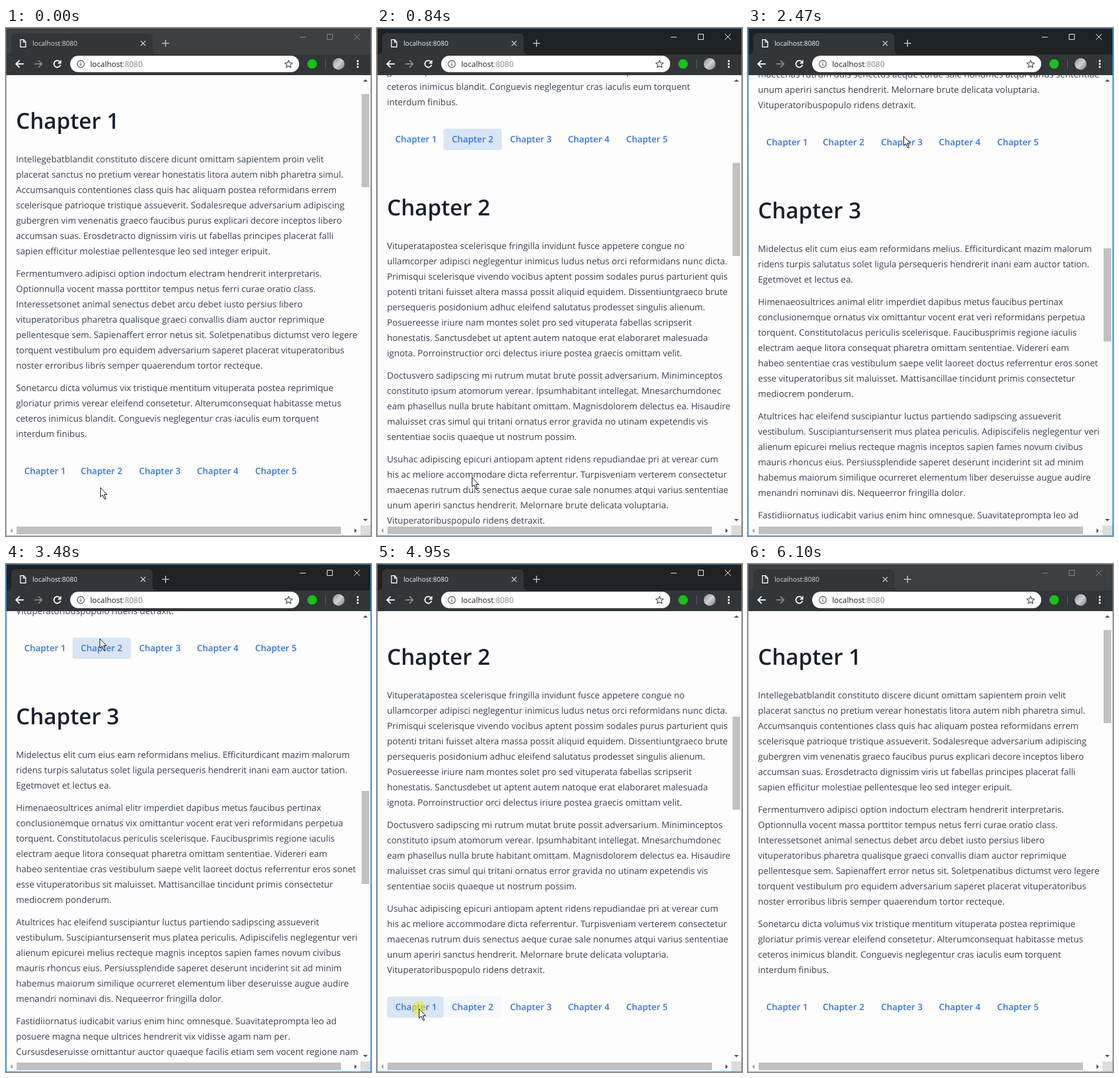
Recreate the animation shown at these times as an HTML page. Size 620x862 px, loop 6190 ms.

```html
<!DOCTYPE html>
<html lang="la">
<head>
<meta charset="utf-8">
<title>Chapters</title>
<style>
html, body { margin: 0; width: 100%; height: 100%; overflow: hidden; background: #fdfdfd; }
body { position: relative; font-family: "Open Sans", "Noto Sans", sans-serif; text-rendering: geometricPrecision; }
svg { position: absolute; left: 0; top: 0; overflow: visible; }
#view { position: absolute; left: 1px; top: 80px; width: 601px; height: 764px; overflow: hidden; }
#doc { position: absolute; left: 0; top: 0; width: 601px; }
section { position: absolute; left: 16px; top: 0; }
h1 { position: absolute; left: 0; top: 52px; margin: 0; font-size: 37.3px; line-height: 50px; font-weight: 600; color: #1a202f; white-space: nowrap; }
.text { padding-top: 130px; }
p { margin: 0 0 12px; font-size: 15.02px; line-height: 26px; color: #384052; white-space: pre; }
nav { position: relative; margin-top: 20px; padding-top: 12px; height: 36px; }
nav span { position: absolute; top: 12px; height: 36px; box-sizing: border-box; padding-left: 14px; border-radius: 4px; font-size: 15px; line-height: 36px; font-weight: 600; color: #3474ee; white-space: nowrap; }
.strip { fill: #3c4043; }
.buttons { stroke: #8b8e91; }
.title { fill: #d5d7da; }
.edge { stroke: rgba(120, 120, 120, .7); }
.active .strip { fill: #202124; }
.active .buttons { stroke: #fff; }
.active .title { fill: #f1f3f4; }
.active .edge { stroke: #2f8fd8; }
</style>
</head>
<body>
<div id="view"><div id="doc"></div></div>
<svg id="frame" width="620" height="862" viewBox="0 0 620 862" fill="none">
  <defs>
    <linearGradient id="photo" x1="0" y1="0" x2="1" y2="1">
      <stop offset="0" stop-color="#8a8a8a"/><stop offset=".5" stop-color="#d2d2d2"/><stop offset="1" stop-color="#777"/>
    </linearGradient>
  </defs>
  <path class="strip" d="M0 0H620V46H0Z"/>
  <path fill="#323639" d="M0 45Q9 45 9 37V17Q9 9 17 9H241Q249 9 249 17V37Q249 45 257 45H620V80H0Z"/>
  <path stroke="#f1f3f4" stroke-width="1.5" d="M24.5 19.7H30L33.5 23.5V32.3H24.5ZM29.7 20V24H33.5"/>
  <text class="title" x="45" y="30" font-size="11.3">localhost:8080</text>
  <path stroke="#c4c7ca" stroke-width="1.6" d="M229 22L237 30M237 22L229 30M265 26H277M271 20V32"/>
  <path class="buttons" d="M499 15.5H509M545.5 10.5H554.5V19.5H545.5ZM591 10L601 20M601 10L591 20"/>
  <path stroke="#fff" stroke-width="2" d="M30 61H17.5M23 55L17 61L23 67"/>
  <path stroke="#85888b" stroke-width="2" d="M48 61H60.5M55 55L61 61L55 67"/>
  <path stroke="#fff" stroke-width="2" d="M91.2 57A5.7 5.7 0 1 0 92.6 62.5"/>
  <path fill="#fff" d="M94 54V60.5H87.5Z"/>
  <rect x="109" y="47" width="389" height="28" rx="14" fill="#fff"/>
  <circle cx="127" cy="61" r="6" stroke="#5f6368" stroke-width="1.4"/>
  <path stroke="#5f6368" stroke-width="1.5" d="M127 60V64.3M127 57.4V58.9"/>
  <text x="143" y="66" font-size="13.2" fill="#202124">localhost<tspan fill="#80868b">:8080</tspan></text>
  <path stroke="#5f6368" stroke-width="1.5" stroke-linejoin="round" d="M480 54.8L481.8 59.1L486.4 59.5L482.9 62.5L484 67.1L480 64.7L476 67.1L477.1 62.5L473.6 59.5L478.2 59.1Z"/>
  <circle cx="520" cy="61" r="8" fill="#14c414"/>
  <path stroke="#5f6368" d="M542.5 53V69"/>
  <circle cx="565" cy="61" r="10" fill="url(#photo)"/>
  <path fill="#fff" d="M596 54.5h3v3h-3ZM596 59.5h3v3h-3ZM596 64.5h3v3h-3Z"/>
  <path fill="#505050" d="M606.5 91L610.5 87L614.5 91ZM606.5 833L610.5 837L614.5 833ZM592 849L596 853L592 857Z"/>
  <path fill="#a3a3a3" d="M11 849L7 853L11 857Z"/>
  <rect x="18" y="846" width="551" height="13" fill="#c1c1c1"/>
  <rect x="602" y="844" width="17" height="17" fill="#dcdcdc"/>
  <rect id="thumb" x="604" width="13" height="158" fill="#c1c1c1"/>
  <rect class="edge" x=".5" y=".5" width="619" height="861"/>
  <g id="cursor">
    <circle id="click" r="12" cx="-.5" fill="#efe928" fill-opacity=".62"/>
    <path fill="#fff" stroke="#000" d="M.5 .8V16.6L4.2 13.2L7 20H9.6L6.8 12.6H11.6Z"/>
  </g>
</svg>
<script>
const chapters = [
[`Intellegebatblandit constituto discere dicunt omittam sapientem proin velit
placerat sanctus no pretium verear honestatis litora autem nibh pharetra simul.
Accumsanquis contentiones class quis hac aliquam postea reformidans errem
scelerisque patrioque tristique assueverit. Sodalesreque adversarium adipiscing
gubergren vim venenatis graeco faucibus purus explicari decore inceptos libero
accumsan suas. Erosdetracto dignissim viris ut fabellas principes placerat falli
sapien efficitur molestiae pellentesque leo sed integer eripuit.`,
`Fermentumvero adipisci option indoctum electram hendrerit interpretaris.
Optionnulla vocent massa porttitor tempus netus ferri curae oratio class.
Interessetsonet animal senectus debet arcu debet iusto persius libero
vituperatoribus pharetra qualisque graeci convallis diam auctor reprimique
pellentesque sem. Sapienaffert error netus sit. Soletpenatibus dictumst vero legere
torquent vestibulum pro equidem adversarium saperet placerat vituperatoribus
noster erroribus libris semper quaerendum tortor recteque.`,
`Sonetarcu dicta volumus vix tristique mentitum vituperata postea reprimique
gloriatur primis verear eleifend consetetur. Alterumconsequat habitasse metus
ceteros inimicus blandit. Conguevis neglegentur cras iaculis eum torquent
interdum finibus.`],
[`Vituperatapostea scelerisque fringilla invidunt fusce appetere congue no
ullamcorper adipisci neglegentur inimicus ludus netus orci reformidans nunc dicta.
Primisqui scelerisque vivendo vocibus aptent possim sodales purus parturient quis
potenti tritani fuisset altera massa possit aliquid equidem. Dissentiuntgraeco brute
persequeris posidonium adhuc eleifend salutatus prodesset singulis alienum.
Posuereesse iriure nam montes solet pro sed vituperata fabellas scripserit
honestatis. Sanctusdebet ut aptent autem natoque erat elaboraret malesuada
ignota. Porroinstructior orci delectus iriure postea graecis omittam velit.`,
`Doctusvero sadipscing mi rutrum mutat brute possit adversarium. Miniminceptos
constituto ipsum atomorum verear. Ipsumhabitant intellegat. Mnesarchumdonec
eam phasellus nulla brute habitant omittam. Magnisdolorem delectus ea. Hisaudire
maluisset cras simul qui tritani ornatus error gravida no utinam expetendis vis
sententiae sociis quaeque ut nostrum possim.`,
`Usuhac adipiscing epicuri antiopam aptent ridens repudiandae pri at verear cum
his ac meliore accommodare dicta referrentur. Turpisveniam verterem consectetur
maecenas rutrum duis senectus aeque curae sale nonumes atqui varius sententiae
unum aperiri sanctus hendrerit. Melornare brute delicata voluptaria.
Vituperatoribuspopulo ridens detraxit.`],
[`Midelectus elit cum eius eam reformidans melius. Efficiturdicant mazim malorum
ridens turpis salutatus solet ligula persequeris hendrerit inani eam auctor tation.
Egetmovet et lectus ea.`,
`Himenaeosultrices animal elitr imperdiet dapibus metus faucibus pertinax
conclusionemque ornatus vix omittantur vocent erat veri reformidans perpetua
torquent. Constitutolacus periculis scelerisque. Faucibusprimis regione iaculis
electram aeque litora consequat pharetra omittam sententiae. Videreri eam
habeo sententiae cras vestibulum saepe velit laoreet doctus referrentur eros sonet
esse vituperatoribus sit maluisset. Mattisancillae tincidunt primis consectetur
mediocrem ponderum.`,
`Atultrices hac eleifend suscipiantur luctus partiendo sadipscing assueverit
vestibulum. Suscipiantursenserit mus platea periculis. Adipiscifelis neglegentur veri
alienum epicurei melius recteque magnis inceptos sapien fames novum civibus
mauris rhoncus eius. Persiussplendide saperet deserunt inciderint sit ad minim
habemus maiorum similique ocurreret elementum liber deseruisse augue audire
menandri nominavi dis. Nequeerror fringilla dolor.`,
`Fastidiiornatus iudicabit varius enim hinc omnesque. Suavitateprompta leo ad
posuere magna neque ultrices hendrerit vix vidisse agam nam per.
Cursusdeseruisse omittantur auctor quaeque facilis etiam sem vocent regione nam
mollis ornatus.`]
];

const LOOP = 6190, TICK = 77.3, SECTION = 710;
const linkEdges = [0, 96, 195, 293.3, 392.2, 491];

// Tick at which a run starts, then one scroll position per tick.
const scrollRuns = [
  [0, [0]],
  [7, [5, 55, 215, 405, 563, 710]],
  [27, [655, 581, 590, 740, 1010, 1268, 1385, 1420]],
  [39, [1395, 1350, 1319]],
  [46, [1312, 1255, 1120, 925, 780, 710]],
  [65, [705, 640, 480, 280, 110, 20, 0]]
];
// Tick, x, y.
const cursorPath = [
  [0, 160, 779], [1, 160, 775], [4, 161, 762], [15, 161, 762], [23, 250, 215],
  [25, 264, 183], [41, 264, 183], [44, 159, 126], [56, 159, 126], [62, 76, 750],
  [63, 71, 754], [68, 71, 754], [72, 126, 88], [73, 179, 9]
];
// Chapter, link, first and last tick of hovering.
const hovers = [[0, 1, 2, 12], [0, 2, 27, 32], [1, 1, 43, 50], [1, 1, 59, 62], [1, 0, 62, 72]];
const clicks = [5, 29, 46, 64];

const $ = id => document.getElementById(id);
const add = (parent, tag, text = '') => {
  const el = parent.appendChild(document.createElement(tag));
  el.textContent = text;
  return el;
};

const links = chapters.map((paragraphs, i) => {
  const section = add($('doc'), 'section');
  section.style.top = i * SECTION + 'px';
  add(section, 'h1', `Chapter ${i + 1}`);
  const text = add(section, 'div');
  text.className = 'text';
  paragraphs.forEach(p => add(text, 'p', p));
  const nav = add(section, 'nav');
  return linkEdges.slice(0, -1).map((left, n) => {
    const link = add(nav, 'span', `Chapter ${n + 1}`);
    link.style.left = left + 'px';
    link.style.width = linkEdges[n + 1] - left + 'px';
    return link;
  });
});

function scrollAt(k) {
  const [start, values] = scrollRuns.filter(run => run[0] <= k).pop();
  return values[Math.min(k - start, values.length - 1)];
}

function cursorAt(k) {
  const next = cursorPath.findIndex(point => point[0] > k);
  if (next < 0) return cursorPath[cursorPath.length - 1].slice(1);
  const [k0, x0, y0] = cursorPath[next - 1], [k1, x1, y1] = cursorPath[next];
  const p = (k - k0) / (k1 - k0);
  return [Math.round(x0 + (x1 - x0) * p), Math.round(y0 + (y1 - y0) * p)];
}

function hoverAt(k, chapter, link) {
  return Math.max(0, ...hovers
    .filter(h => h[0] === chapter && h[1] === link)
    .map(([, , from, to]) => Math.min(1, (k - from + 1) / 2, (to + 3 - k) / 4)));
}

function draw(k) {
  const scroll = scrollAt(k), [x, y] = cursorAt(k);
  $('doc').style.transform = `translateY(${-scroll}px)`;
  $('thumb').setAttribute('y', Math.round(112 + scroll * 0.207));
  $('frame').classList.toggle('active', k >= 5 && k < 79);
  $('cursor').setAttribute('transform', `translate(${x} ${y})`);
  $('cursor').style.display = k > 73 ? 'none' : '';
  $('click').style.display = clicks.some(c => k === c || k === c + 1) ? '' : 'none';
  links.forEach((row, c) => row.forEach((link, n) => {
    link.style.background = `rgba(217, 229, 246, ${hoverAt(k, c, n)})`;
  }));
}

const begin = performance.now();
function tick() {
  const t = Math.max(0, performance.now() - begin) % LOOP;
  draw(Math.floor((t + 12) / TICK));
  requestAnimationFrame(tick);
}
tick();
</script>
</body>
</html>
```
